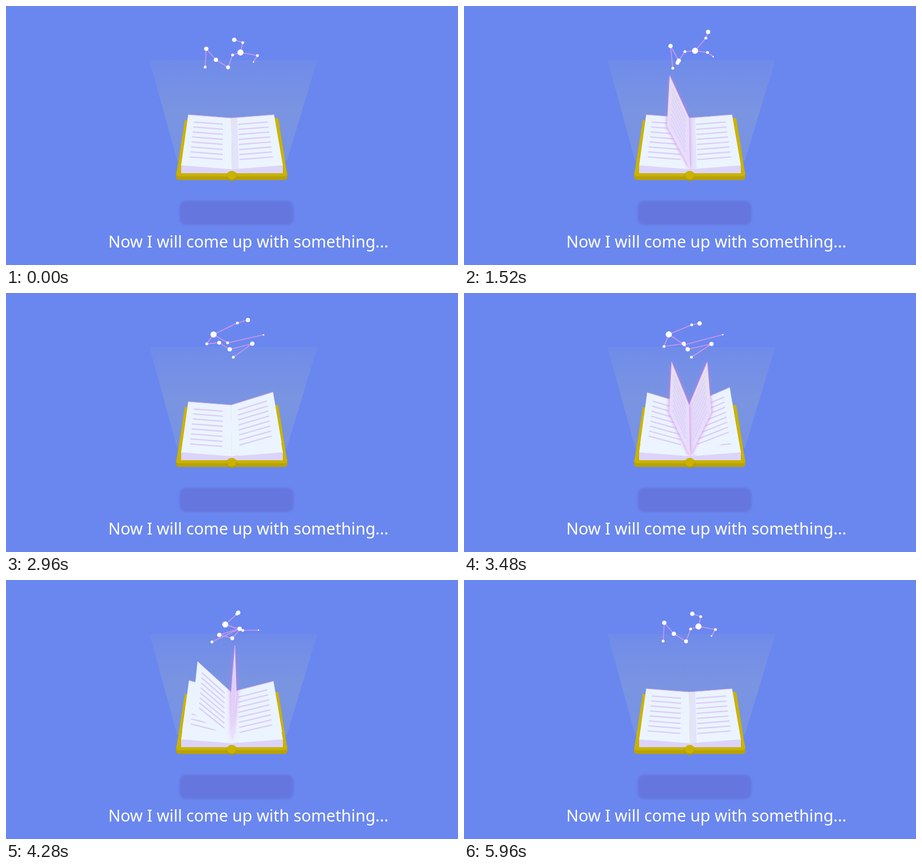
These frames come from a looping animation (800x460 px, 6000 ms). An HTML page with a canvas:

```html
<!DOCTYPE html>
<html lang="en">
<head>
<meta charset="utf-8">
<style>
html, body { margin: 0; width: 800px; height: 460px; overflow: hidden; background: #6a87ef; }
canvas { display: block; }
</style>
</head>
<body>
<canvas id="stage" width="800" height="460"></canvas>
<script>
const ctx = document.getElementById('stage').getContext('2d');
const LOOP = 6000, FLIP = 765;

// Start time of each page turn
const flips = [1061, 1784, 2837, 3029, 3170, 3327, 3630, 3744, 3913, 4173];

// Constellation: radius per star, then x, y of every star in each pose
const radii = [2.5, 3.8, 3.8, 3.4, 2.5, 5.4, 2.5, 3.8, 2.5, 1.3];
const links = [[0, 1], [1, 2], [2, 3], [3, 4], [4, 5], [5, 6], [6, 7], [5, 8], [8, 9]];
const poseTimes = [600, 1520, 2320, 3480, 4280, 4800, 5200];
const poses = [
  [352.5, 108.5, 354.5, 76, 371.5, 95.5, 393, 109, 401, 87, 415, 82.5, 419, 65, 404, 60, 445, 88, 438, 99.5],
  [369.5, 110.5, 365.5, 71, 380, 97, 378, 101, 391, 81, 409, 79.5, 428, 57, 432, 46, 431, 82.5, 441, 90],
  [400.5, 113.5, 410.5, 83, 395.5, 99.5, 351.5, 86.5, 373, 69.5, 398, 74.5, 438, 48, 464, 30.5, 415.5, 73, 444, 78.5],
  [402.5, 114, 438, 90.5, 396, 100, 389, 90, 354, 95, 362.5, 73.5, 403, 56.5, 417, 54, 390, 92, 458, 74],
  [364.5, 110, 413.5, 86.5, 377.5, 97.5, 400.5, 103.5, 414, 88, 388, 79, 408.5, 60.5, 411, 58, 419, 89.5, 447, 89],
  [355, 109, 373.5, 79.5, 372.5, 96, 394, 108, 398, 89, 411, 82, 417.5, 64.5, 405, 60, 443, 89, 439.5, 98]
];
poses.push(poses[0]);

const ease = u => u * u * (3 - 2 * u);
const lerp = (a, b, u) => a + (b - a) * u;

function shape(points, fill) {
  ctx.beginPath();
  points.forEach(([x, y]) => ctx.lineTo(x, y));
  ctx.closePath();
  ctx.fillStyle = fill;
  ctx.fill();
}

function line(points, color, width) {
  ctx.beginPath();
  points.forEach(([x, y]) => ctx.lineTo(x, y));
  ctx.strokeStyle = color;
  ctx.lineWidth = width;
  ctx.stroke();
}

function dot(x, y, rx, ry, fill) {
  ctx.beginPath();
  ctx.ellipse(x, y, rx, ry, 0, 0, Math.PI * 2);
  ctx.fillStyle = fill;
  ctx.fill();
}

function drawBackdrop() {
  ctx.fillStyle = '#6a87ef';
  ctx.fillRect(0, 0, 800, 460);

  const glow = ctx.createLinearGradient(0, 96, 0, 275);
  glow.addColorStop(0, 'rgba(150,170,200,.13)');
  glow.addColorStop(.5, 'rgba(150,172,200,.36)');
  glow.addColorStop(1, 'rgba(150,172,205,.3)');
  shape([[254, 96], [551, 96], [497, 275], [303, 275]], glow);

  ctx.save();
  ctx.filter = 'blur(1.5px)';
  ctx.beginPath();
  ctx.roundRect(307, 346, 202, 43, 12);
  ctx.fillStyle = '#6577df';
  ctx.fill();
  ctx.restore();

  ctx.font = '300 28.7px "Noto Sans", "Open Sans", sans-serif';
  ctx.fillStyle = '#fff';
  ctx.fillText('Now I will come up with something...', 181, 429);
}

function drawCover() {
  ctx.lineJoin = 'round';
  const board = [[321, 203], [478, 203], [493, 298], [306, 298]];
  const edge = [[306, 296], [493, 296], [493, 304], [306, 304]];
  shape(edge, '#b7a106');
  line([...edge, edge[0]], '#b7a106', 10);
  shape(board, '#c9b300');
  line([...board, board[0]], '#c9b300', 9);
}

// Page at an angle: 0 lies right, PI lies left
function drawPage(angle, speed) {
  const c = Math.cos(angle), s = Math.sin(angle);
  const top = [398.5 + 76 * c, 193 - 78 * s];
  const bottom = [400 + 90 * c, 283 - 78 * s];
  const spineTop = [398.5, 199], spineBottom = [400, 290];
  const at = (u, v) => [0, 1].map(k =>
    lerp(lerp(spineTop[k], top[k], u), lerp(spineBottom[k], bottom[k], u), v));

  ctx.save();
  if (speed > .6) {
    ctx.shadowColor = '#d777e6';
    ctx.shadowBlur = 9 * speed;
  }
  const paper = ctx.createLinearGradient(0, top[1], 0, bottom[1]);
  paper.addColorStop(0, speed > .6 ? '#e6e0ea' : '#ebf3fe');
  paper.addColorStop(1, speed > .6 ? '#e6defb' : '#ecf5ff');
  shape([spineTop, top, bottom, spineBottom], paper);
  ctx.restore();

  line([spineTop, top], '#dfb2f2', 1);
  ctx.globalAlpha = 1 - .5 * speed;
  ctx.lineCap = 'round';
  for (let i = 0; i < 8; i++) {
    const v = .134 + i * .0983;
    line([at(c < 0 ? .84 : .82, v), at(c < 0 ? .2 : .165, v)], '#dacdfa', 2.3);
  }
  ctx.lineCap = 'butt';
  ctx.globalAlpha = 1;
}

function drawBook(t) {
  drawCover();
  shape([[310, 282], [400, 288], [490, 282], [490, 297], [310, 297]], '#dcd3fa');
  drawPage(Math.PI, 0);
  drawPage(0, 0);
  shape([[399, 200], [409, 199], [412, 289], [400, 290]], 'rgba(220,214,247,.55)');

  flips.map(start => (t - start) / FLIP)
    .filter(u => u > 0 && u < 1)
    .map(u => ({ angle: ease(u) * Math.PI, speed: 4 * u * (1 - u) }))
    .map(p => ({ ...p, speed: Math.max(0, (p.speed - .85) / .15) }))
    .sort((a, b) => Math.abs(b.angle - Math.PI / 2) - Math.abs(a.angle - Math.PI / 2))
    .forEach(p => drawPage(p.angle, p.speed));

  dot(399.5, 302, 9.5, 9, '#b39d08');
  dot(399.5, 300.5, 8.5, 7.5, '#c9b300');
}

// Monotone cubic through the poses
function coordinate(k, t) {
  const last = poseTimes.length - 1;
  if (t <= poseTimes[0] || t >= poseTimes[last]) return poses[0][k];
  const secant = i => (poses[i + 1][k] - poses[i][k]) / (poseTimes[i + 1] - poseTimes[i]);
  const slope = i => {
    if (i === 0 || i === last) return 0;
    const a = secant(i - 1), b = secant(i);
    return a * b <= 0 ? 0 : 2 * Math.sign(a) * Math.min(Math.abs(a), Math.abs(b));
  };
  const i = poseTimes.findIndex(time => time > t) - 1;
  const span = poseTimes[i + 1] - poseTimes[i];
  let u = (t - poseTimes[i]) / span;
  if (i === 2) u *= 1.7 - .7 * u; // brisk departure from the widest pose
  return lerp(poses[i][k], poses[i + 1][k], ease(u))
    + span * u * (1 - u) * (slope(i) * (1 - u) - slope(i + 1) * u);
}

function drawStars(t) {
  const stars = radii.map((r, i) => [coordinate(2 * i, t), coordinate(2 * i + 1, t)]);
  links.forEach(([a, b]) => line([stars[a], stars[b]], '#d096ec', 1.6));
  stars.forEach(([x, y], i) => dot(x, y, radii[i], radii[i], '#fff'));
}

function frame() {
  const t = performance.now() % LOOP;
  drawBackdrop();
  drawBook(t);
  drawStars(t);
  requestAnimationFrame(frame);
}
frame();
</script>
</body>
</html>
```
